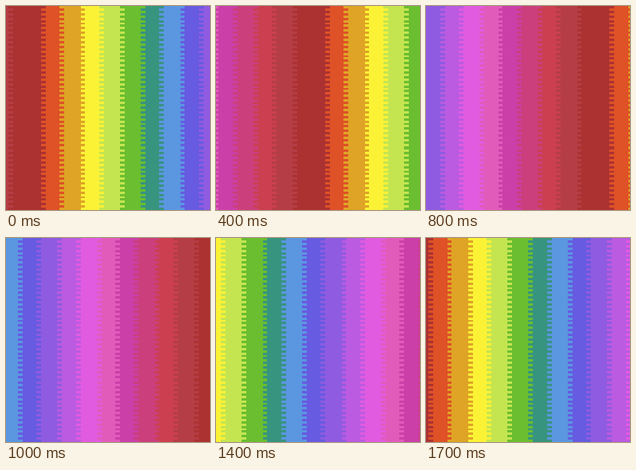
An HTML page with a canvas for the animation above (1800 ms loop, 256x256 px).

```html
<!DOCTYPE html>
<html lang="en">
<head>
<meta charset="utf-8">
<title>Rainbow scroll</title>
<style>
  html, body { margin: 0; width: 100%; height: 100%; overflow: hidden; }
  canvas { display: block; width: 100vw; height: 100vh; image-rendering: pixelated; }
</style>
</head>
<body>
<canvas width="256" height="256"></canvas>
<script>
const SIZE = 256, STEP = 8, STEP_MS = 100, STEPS = 18, ORIGIN = 2;
const ROWS = 87, SEAM = 60;

// [colour, width in cells, 1 if its left edge starts with its own tooth]
const bands = [
  ['#ac3232', 14, 1], ['#df5126', 8, 0], ['#dfa426', 9, 1], ['#fbf236', 8, 1],
  ['#c4e550', 9, 1], ['#6abe30', 9, 1], ['#37947f', 8, 0], ['#5b96e1', 9, 0],
  ['#665be1', 8, 0], ['#8f5be1', 9, 0], ['#ba5be1', 8, 0], ['#e15be1', 9, 0],
  ['#e15bbb', 8, 0], ['#cb3fa8', 8, 0], ['#cb3f7d', 9, 0], ['#cb3f51', 8, 0],
  ['#b53d45', 9, 1]
];
const period = bands.reduce((sum, [, width]) => sum + width, 0);
const ctx = document.querySelector('canvas').getContext('2d');

// cell coordinates to pixels; rows above the seam are slightly taller
const cellX = x => Math.ceil(x * 32 / 11);
const cellY = y => Math.round(y <= SEAM ? y * 2.93 : SIZE - (ROWS - y) * 32 / 11);

function fillCells(colour, x1, x2, y1, y2) {
  const left = cellX(x1), top = cellY(y1);
  ctx.fillStyle = colour;
  ctx.fillRect(left, top, cellX(x2) - left, cellY(y2) - top);
}

function drawStrip(left) {
  let x = left;
  bands.forEach(([colour, width, ownFirst], i) => {
    const previous = bands.at(i - 1)[0];
    fillCells(colour, x, x + width, 0, ROWS);
    // interlocking teeth, two cells wide
    for (let y = 0; y < ROWS; y++) {
      fillCells((y + ownFirst) % 2 ? colour : previous, x - 1, x + 1, y, y + 1);
    }
    x += width;
  });
}

function frame() {
  const step = Math.floor(performance.now() / STEP_MS) % STEPS;
  const left = ORIGIN + step * STEP;
  drawStrip(left - period);
  drawStrip(left);
  requestAnimationFrame(frame);
}
frame();
</script>
</body>
</html>
```
